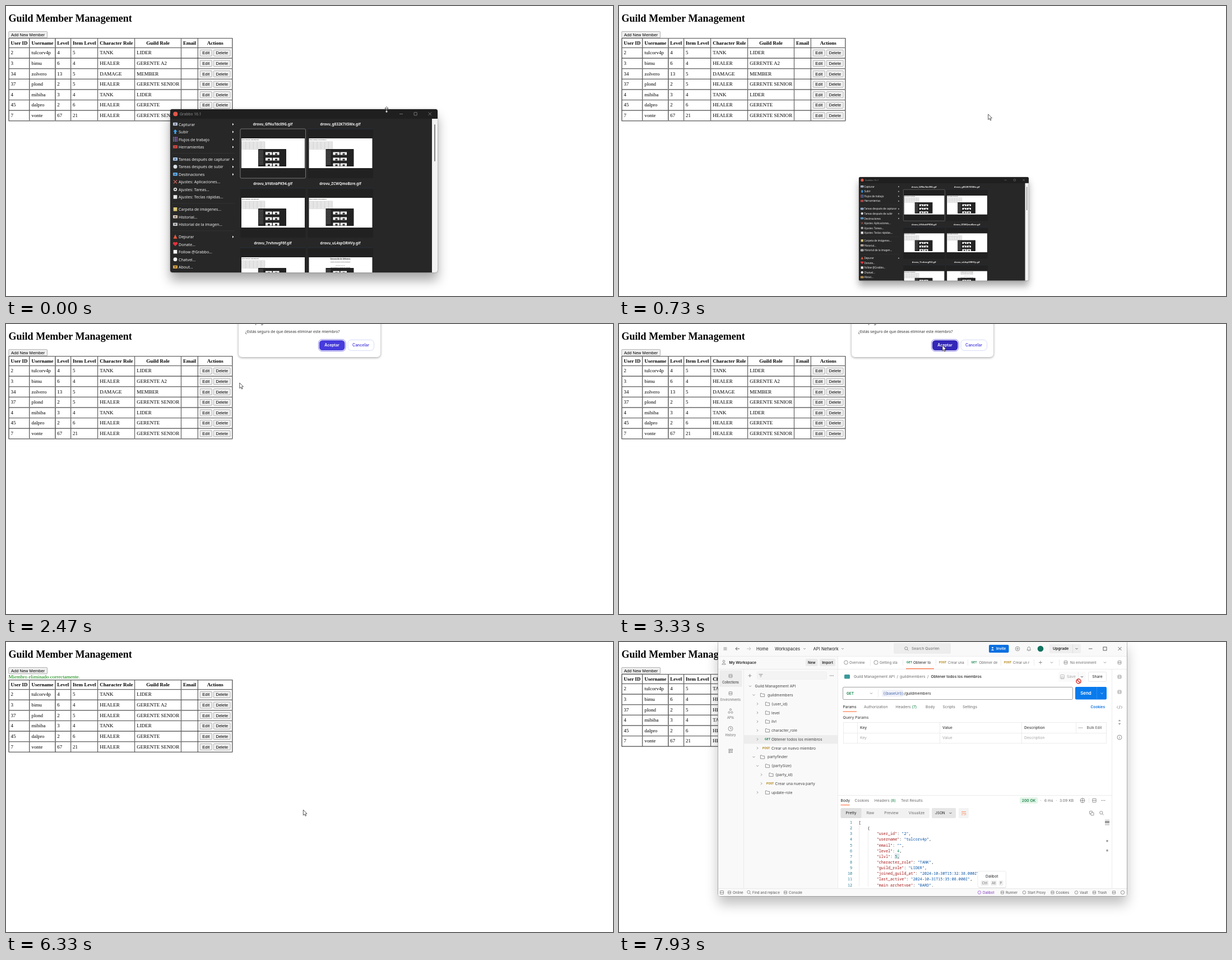
Recreate the animation shown at these times as an HTML page. Size 1083x517 px, loop 8000 ms.

```html
<!DOCTYPE html>
<html lang="es">
<head>
<meta charset="utf-8">
<title>Guild Member Management</title>
<style>
html, body { margin: 0; width: 100%; height: 100%; overflow: hidden; background: #fff; }
#page { position: absolute; width: 1920px; transform: scale(.56406); transform-origin: 0 0;
  font: 16px "Liberation Serif", "Times New Roman", serif; color: #000; }
#body { margin: 21.44px 8px 0; }
h1 { font-size: 32px; line-height: 37px; margin: 0 0 21.44px; }
#add { height: 21px; }
button { height: 21px; box-sizing: border-box; padding: 1px 7px; border: 1px solid #767676; border-radius: 3px;
  background: #efefef; color: #000; font: 13.333px/15px "Liberation Sans", Arial, sans-serif; vertical-align: baseline; }
button.hover { background: #e0e0e0; border-color: #4f4f4f; }
#msg { color: green; height: 18px; line-height: 18px; }
table { border: 1px solid #2a2a2a; border-spacing: 0; }
th, td { border: 1px solid #2a2a2a; padding: 5px; line-height: 18px; white-space: nowrap; }
td { height: 21px; }
td:last-child { line-height: 0; }
.win { position: absolute; overflow: hidden; }
.win svg { display: block; }
#grab { left: 293px; top: 184px; width: 477px; height: 291px; border-radius: 4px; transform-origin: 0 0;
  box-shadow: 0 14px 20px rgba(0,0,0,.34), 0 0 3px rgba(0,0,0,.3); font-family: "Noto Sans", sans-serif; }
#api { left: 177px; top: -2px; width: 729px; height: 455px; border-radius: 4px; transform-origin: 486px 518px;
  box-shadow: 0 14px 22px rgba(0,0,0,.25), 0 0 0 .6px #999; font-family: Inter, sans-serif; }
#dlg { left: 415px; top: -20px; width: 253px; height: 79px; border-radius: 6px; background: #fff;
  box-shadow: 0 1px 4px rgba(0,0,0,.4); font-family: "Noto Sans", sans-serif; }
#card { left: 767px; top: 424px; width: 115px; height: 100px; border-radius: 4px; background: #f3f3f3;
  box-shadow: 0 0 1px #777; }
#cur { position: absolute; left: 0; top: 0; overflow: visible; }
</style>
</head>
<body>
<div id="page"><div id="body">
  <h1>Guild Member Management</h1>
  <div id="add"><button>Add New Member</button></div>
  <div id="msg">Miembro eliminado correctamente.</div>
  <table id="table"></table>
</div></div>
<div class="win" id="dlg"></div>
<div class="win" id="grab"></div>
<div class="win" id="card"></div>
<div class="win" id="api"></div>
<svg id="cur" width="1" height="1">
  <path id="arrow" d="M0 0V9.6L2.2 7.6 3.8 11 5.3 10.3 3.8 7 6.7 6.8Z" fill="#fff" stroke="#111" stroke-width=".7"/>
  <path id="resize" d="M0-5.5L3-2.3H.8V2.3H3L0 5.5-3 2.3H-.8V-2.3H-3Z" fill="#fff" stroke="#111" stroke-width=".7"/>
  <g id="no" fill="none" stroke="#d8302c" stroke-width="1.5"><circle r="4" fill="#fff"/><path d="M-2.8-2.8L2.8 2.8"/></g>
</svg>
<script>
const $ = id => document.getElementById(id);
const INK = '#212121', MID = '#6b6b6b', PALE = '#a6a6a6', LINE = '#e4e4e4', ORANGE = '#ff6c37',
  GREEN = '#0a8043', AMBER = '#ad7a03', BLUE = '#0a70e0';

// Drawing helpers: y of a text is its middle line
const T = (x, y, s, c = INK, w = 400, z = 6.77, a = 'start') =>
  `<text x="${x}" y="${y + z * .36}" font-size="${z}" fill="${c}" font-weight="${w}" text-anchor="${a}">${s}</text>`;
const R = (x, y, w, h, f, r = 0, s = 'none') =>
  `<rect x="${x}" y="${y}" width="${w}" height="${h}" fill="${f}" rx="${r}" stroke="${s}" stroke-width=".7"/>`;
const P = (d, c = MID, f = 'none', w = .7) => `<path d="${d}" fill="${f}" stroke="${c}" stroke-width="${w}"/>`;
const C = (x, y, r, f = 'none', s = MID) => `<circle cx="${x}" cy="${y}" r="${r}" fill="${f}" stroke="${s}" stroke-width=".7"/>`;
const down = (x, y, c) => P(`M${x - 2} ${y - 1}l2 2l2-2`, c);
const right = (x, y) => P(`M${x - 1} ${y - 2}l2 2l-2 2`);
const box = (x, y, r = 2.8) => R(x - r, y - r, 2 * r, 2 * r, 'none', .6, MID) + P(`M${x - r} ${y}h${2 * r}`);
const folder = (x, y) => P(`M${x - 3.6} ${y - 3}h2.6l1 1.2h3.6v4.8h-7.2z`);
const dots = (x, y) => [-2.6, 0, 2.6].map(d => C(x + d, y, .7, MID, 'none')).join('');
const glass = (x, y) => C(x - .7, y - .7, 2.6) + P(`M${x + 1.2} ${y + 1.2}l2.3 2.3`);
const plus = (x, y) => P(`M${x - 3} ${y}h6M${x} ${y - 3}v6`);
const hline = (x, y, w, c = LINE) => P(`M${x} ${y}h${w}`, c);
const vline = (x, y, h, c = LINE) => P(`M${x} ${y}v${h}`, c);
const svg = (x, y, w, h, s) => `<svg width="${w}" height="${h}" viewBox="${x} ${y} ${w} ${h}">${s}</svg>`;

// Page table
const members = `2|tulcorv4p|4|5|TANK|LIDER
3|bimu|6|4|HEALER|GERENTE A2
34|zolvero|13|5|DAMAGE|MEMBER
37|plond|2|5|HEALER|GERENTE SENIOR
4|mibiba|3|4|TANK|LIDER
45|dalpro|2|6|HEALER|GERENTE
7|vonte|67|21|HEALER|GERENTE SENIOR`.split('\n').map(r => r.split('|'));
$('table').innerHTML = '<tr>' + ['User ID', 'Username', 'Level', 'Item Level', 'Character Role', 'Guild Role', 'Email', 'Actions']
  .map(h => `<th>${h}</th>`).join('') + '</tr>' + members.map(m => '<tr>' + m.map(c => `<td>${c}</td>`).join('') +
  '<td></td><td><button>Edit</button><span style="font-size:16px"> </span><button>Delete</button></td></tr>').join('');
const doomed = $('table').rows[3], buttons = [...document.querySelectorAll('button')];

// Confirmation dialog
$('dlg').innerHTML = svg(415, -20, 253, 79,
  T(427, -3, 'Esta página dice', INK, 400, 8) +
  T(427, 14, '¿Estás seguro de que deseas eliminar este miembro?', '#333', 400, 6.8) +
  R(557.5, 27.5, 48.5, 21, '#fff', 6.5, '#5a50dd') + '<g id="ok">' + R(559, 29, 45.5, 18, 'currentColor', 5.5) + '</g>' +
  R(610, 28.3, 46.5, 19, '#fff', 6, '#c3cdf6') + '<g font-family="Inter, sans-serif">' +
  T(581.5, 38, 'Aceptar', '#fff', 600, 6.9, 'middle') + T(633, 38, 'Cancelar', '#5046e0', 600, 6.9, 'middle') + '</g>');

// Capture tool window
function shot(x, y, doc) {
  let s = R(x, y, 113, 53, '#fff');
  if (doc) {
    s += T(x + 56, y + 3, 'Generación de Informes', '#222', 700, 3, 'middle') +
      T(x + 56, y + 8, 'Nuevo informe de datos del gremio', '#333', 600, 2, 'middle') +
      T(x + 56, y + 14, 'Resumen del mes', '#666', 400, 2, 'middle') +
      T(x + 56, y + 18, 'Lista de datos y valores del informe', '#333', 600, 2, 'middle');
  } else {
    s += T(x + .7, y + 2.6, 'Guild Member Management', '#222', 700, 2.2);
    for (let i = 0; i < 8; i++) s += hline(x + 1, y + 6 + i * 1.9, 41, '#bbb');
    for (let i = 0; i < 7; i++) s += vline(x + 1 + i * 6.8, y + 6, 13.4, '#ccc');
  }
  s += R(x + 30, y + 19, 50, 31, '#222', .6);
  for (let i = 0; i < 3; i++)
    for (const d of [43, 56]) s += R(x + d, y + 24.5 + i * 10, 11.5, 5, '#fff') + R(x + d + 4, y + 26.4 + i * 10, 4, 3, '#333');
  for (let i = 0; i < 11; i++) s += hline(x + 31, y + 22 + i * 2.4, 8, '#777');
  return s;
}
// label, icon colour, icon kind, has submenu
const menu = [
  [['Capturar', '#bcc8dc', 'r', 1], ['Subir', '#3fa4f0', 'u', 1], ['Flujos de trabajo', '', 'g', 1], ['Herramientas', '#d8443c', 'r', 1]],
  [['Tareas después de capturar', '#a9c8ee', 'r', 1], ['Tareas después de subir', '#dcdfe6', 'c', 1], ['Destinaciones', '#5aa9e6', 'r', 1],
    ['Ajustes: Aplicaciones...', '#d0645c', 'x'], ['Ajustes: Tareas...', '#d8d8d8', 'o'], ['Ajustes: Teclas rápidas...', '#e8e8e8', 'q']],
  [['Carpeta de imágenes...', '#dcc878', 'q'], ['Historial...', '#d8c6b4', 'r'], ['Historial de la imagen...', '#c9c9c9', 'r']],
  [['Depurar', '#e8583c', 't', 1], ['Donate...', '#e2323c', 'h'], ['Follow @Grabbo...', '#f4f4f4', 'q'], ['Chatvel...', '#f4f4f4', 'c'], ['About...', '#d9a441', 'r']]
];
function icon(x, y, c, kind) {
  switch (kind) {
    case 'u': return P(`M${x} ${y - 4}l3.5 4h-2v4h-3v-4h-2z`, 'none', c);
    case 'g': return [0, 1, 2, 3, 4, 5, 6, 7, 8].map(i => R(x - 4 + i % 3 * 3, y - 4 + (i / 3 | 0) * 3, 2, 2, ['#e0566a', '#4fa3e8', '#9b6ad8'][i % 3])).join('');
    case 'c': return C(x, y, 3.4, c, 'none');
    case 'x': return P(`M${x - 3} ${y - 3}l6 6M${x + 3} ${y - 3}l-6 6`, c, 'none', 1.3);
    case 'o': return C(x, y, 3.2, c, 'none') + C(x, y, 1.2, '#272727', 'none');
    case 'q': return R(x - 3.3, y - 3.3, 6.6, 6.6, c);
    case 't': return P(`M${x} ${y - 4}l3.5 7.6h-7z`, 'none', c);
    case 'h': return P(`M${x} ${y + 3.5}l-4-4.2a2 2 0 0 1 4-2a2 2 0 0 1 4 2z`, 'none', c);
    default: return R(x - 4, y - 2.8, 8, 5.6, c, .8) + R(x - 1.5, y - 1, 3, 2, '#556');
  }
}
function grabWindow() {
  let s = R(293, 184, 477, 291, '#272727') + R(293, 184, 477, 17, '#1f1f1f') + C(302.3, 192.5, 4, '#e0584a', 'none') +
    T(310, 192.5, 'Grabbo 16.1', '#8f8f8f', 400, 6.7) + hline(702, 192.5, 6, '#999') +
    R(728, 189.7, 5.2, 5.2, 'none', .5, '#999') + P('M753.5 189.5l5.6 5.6m0-5.6l-5.6 5.6', '#999') +
    R(760, 201, 10, 274, '#f2f2f2') + R(764, 211, 2, 66, '#858585', 1);
  let y = 211;
  for (const group of menu) {
    for (const [label, c, kind, sub] of group) {
      s += icon(302, y - .5, c, kind) + T(308, y, label, '#f0f0f0', 400, 7.05);
      if (sub) s += P(`M404 ${y - 2.3}l2.4 2.2l-2.4 2.2z`, 'none', '#fff');
      y += 13.5;
    }
    if (y < 470) s += hline(297, y - 2.5, 111, '#383838');
    y += 8.4;
  }
  const files = ['GfNuTdc09G', 'g832K7X5Wx', 'bYdtnbPK94', 'ZCWQmoBzre', '7rvhnvgF6f', 'uL4spORHVy'];
  files.forEach((f, i) => {
    const x = 418 + i % 2 * 120.5, top = 219 + (i >> 1) * 106;
    s += T(x + 58, top - 8, `drovu_${f}.gif`, '#f0f0f0', 700, 6.4, 'middle') +
      R(x, top, 116.5, 88, '#212121', 2, i ? 'none' : '#999') + (i ? hline(x, top, 116, '#2a3648') : '') + shot(x + 2, top + 17, i == 5);
  });
  return svg(293, 184, 477, 291, s);
}
$('grab').innerHTML = grabWindow();

// API client window
function apiWindow() {
  const small = 6.2;
  let s = R(177, -2, 729, 455, '#fff') + R(177, -2, 729, 27, '#f9f9f9') + R(177, 25, 213, 414, '#f9f9f9');
  // title bar
  s += P('M186.5 10h6m-6 2h6m-6 2h6') + P('M215 12h-7m3-3l-3 3l3 3', INK) + P('M228 12h7m-3-3l3 3l-3 3', PALE) +
    T(245, 12, 'Home', INK, 400, 7.7) + T(278, 12, 'Workspaces', INK, 400, 7.7) + T(346.5, 12, 'API Network', INK, 400, 7.7) +
    down(331, 12) + down(399, 12) + R(490, 2, 102, 19, '#ededed', 2) + glass(513, 12) + T(522, 11.8, 'Search Quorlen', MID) +
    R(660, 5, 35.5, 14, BLUE, 2) + C(666.5, 10.3, 1.3, '#fff', 'none') + P('M664 15q2.5-4 5 0z', 'none', '#fff') + T(673, 12, 'Invite', '#fff', 600, 6.5) +
    C(711, 12, 3.8) + C(711, 12, 1.3) + P('M728 14.5h6.6l-1-1.5v-2a2.3 2.3 0 0 0-4.6 0v2zm2.5 1.5h1.6') + C(752, 12, 5.3, '#12735f', 'none') +
    R(768, 4, 56, 16, '#efefef', 2) + T(774, 12, 'Upgrade', INK, 600, 6.8) + vline(809.5, 4, 16, '#d8d8d8') + down(816.5, 12, INK) +
    hline(838, 12, 6.5, INK) + R(864, 9, 6, 6, 'none', 0, INK) + P('M890.5 9l6 6m0-6l-6 6', INK);
  // second bar
  s += hline(177, 25.5, 729) + hline(177, 48.5, 729) + C(187, 34.3, 1.8) + P('M183.7 40q3.3-5.5 6.6 0z') + T(196.5, 36.5, 'My Workspace', INK, 600, 6.7) +
    R(333, 30, 21.5, 13, '#ebebeb', 2) + T(343.7, 36.5, 'New', INK, 600, 6.2, 'middle') +
    R(358, 30, 28, 13, '#ebebeb', 2) + T(372, 36.5, 'Import', INK, 600, 6.2, 'middle') +
    C(405, 36.5, 3.4) + T(411, 36.5, 'Overview', MID, 400, small) + C(458.5, 36.5, 3.6) + T(465, 36.5, 'Getting sta', MID, 400, small) +
    plus(752, 36.5) + down(772, 36.5) + box(797, 36.5) + T(805, 36.5, 'No environment', MID, 400, small) + down(867, 36.5) + box(893, 36.5);
  for (const x of [448, 506, 565, 622, 681, 740, 785]) s += vline(x + .5, 31, 11);
  for (const [x, verb, tx, name, c] of [[513, 'GET', 525, 'Obtener to', INK], [571, 'POST', 587, 'Crear una', MID], [628.5, 'GET', 642.5, 'Obtener de', MID], [687, 'POST', 703, 'Crear un r', MID]])
    s += T(x, 36.7, verb, verb == 'GET' ? GREEN : AMBER, 700, 4.9) + T(tx, 36.5, name, c, 400, small);
  s += R(512, 47, 50, 1.2, ORANGE);
  // left rail
  s += R(179, 50.5, 40.5, 29.5, '#ededed', 2) + vline(222.5, 48, 391) + vline(390.5, 25, 414) + box(199, 60.5) + box(199, 91.5) +
    C(199, 120.5, 1.6) + C(196.5, 125.5, 1.6) + C(201.5, 125.5, 1.6) + C(199, 154.5, 4) + P('M199 152v3h2') +
    R(196, 191, 2.4, 2.4, 'none', 0, MID) + R(200, 191, 2.4, 2.4, 'none', 0, MID) + R(196, 195, 2.4, 2.4, 'none', 0, MID) + P('M199.6 196.2h3.4m-1.7-1.7v3.4');
  [['Collections', 71.5], ['Environments', 102.5], ['APIs', 134.5], ['History', 166]].forEach(([n, y], i) =>
    s += T(199, y, n, i ? MID : INK, 400, 5.64, 'middle'));
  // collection tree: chevron x, open, mark x, mark, text x, text
  s += plus(233.5, 60) + R(246.5, 53, 124, 13.5, '#f4f4f4', 2, '#eee') + P('M249.5 57.5h7m-5.6 2.3h4.2m-2.8 2.3h1.4') + dots(379.5, 60) + R(223, 166, 167, 15.5, '#ededed');
  [[234, 1, 0, '', 242.5, 'Guild Management API'], [240.5, 1, 256, 'F', 265, 'guildmembers'], [247, 0, 265, 'F', 272, '{user_id}'],
    [247, 0, 265, 'F', 272, 'level'], [247, 0, 265, 'F', 272, 'ilvl'], [247, 0, 265, 'F', 272, 'character_role'],
    [247, 0, 260, 'GET', 272, 'Obtener todos los miembros'], [247, 0, 256, 'POST', 272, 'Crear un nuevo miembro'],
    [240.5, 1, 256, 'F', 265, 'partyfinder'], [247, 1, 265, 'F', 272, '{partySize}'], [254, 0, 271.5, 'F', 279, '{party_id}'],
    [254, 0, 263, 'POST', 278.5, 'Crear una nueva party'], [247, 0, 265, 'F', 272, 'update-role']
  ].forEach(([cx, open, mx, mark, x, label], i) => {
    const y = 78.7 + i * 15.79;
    s += (open ? down : right)(cx, y) + T(x, y, label, '#444', 400, 6.77);
    if (mark == 'F') s += folder(mx, y);
    else if (mark) s += T(mx, y, mark, mark == 'GET' ? GREEN : AMBER, 700, 4.9);
  });
  // request
  s += R(402, 58, 10, 7.5, '#3a9a9c', 1.5) + T(419, 62, 'Guild Management API', MID) + T(495.5, 62, '/', MID) + T(501, 62, 'guildmembers', MID) +
    T(550, 62, '/', MID) + T(556.5, 62, 'Obtener todos los miembros', INK, 500, 6.7) +
    R(784, 53, 49, 18, '#fafafa', 2) + R(787.5, 58.5, 7, 7, 'none', 1, PALE) + R(789.5, 62, 3, 3.5, 'none', 0, PALE) + T(799, 62, 'Save', PALE) + vline(819.5, 53, 18) + down(826, 62, INK) +
    R(837.5, 53.5, 32, 17, '#fff', 2, '#ddd') + T(853.5, 62, 'Share', INK, 400, 6.77, 'middle') +
    R(399.5, 80.5, 410, 22, '#fff', 2, '#777') + T(406, 91.5, 'GET', GREEN, 600, 6.5) + down(450, 91.5) + vline(462.5, 85, 13) +
    R(469, 85.5, 38, 12, '#f0f1f8', 1.5) + T(471.5, 91.3, '{{baseUrl}}', '#3c62ad') + T(508.5, 91.3, '/guildmembers') +
    R(814, 80, 56, 22.5, '#097bed', 2) + T(833, 91.3, 'Send', '#fff', 600, 7.9, 'middle') + vline(852.5, 80, 22.5, '#3f97f1') + down(861.5, 91.5, '#fff');
  const counted = (n, c) => `${n} <tspan fill="${GREEN}">(${c})</tspan>`;
  [[399.5, 'Params'], [437, 'Authorization'], [493.5, counted('Headers', 7)], [547, 'Body'], [577.5, 'Scripts'], [613, 'Settings']]
    .forEach(([x, n], i) => s += T(x, 116, n, i ? MID : INK));
  s += T(841.5, 116, 'Cookies', BLUE, 600, 6.5) + R(399.5, 123.5, 24.5, 1.1, ORANGE) + T(399.5, 134.8, 'Query Params', '#555', 500) +
    R(400.5, 143.5, 469, 37, 'none', 0, LINE) + hline(400, 162.5, 470) + vline(815.5, 143, 19.5);
  for (const x of [425.5, 572.5, 718.5]) s += vline(x, 143, 37.7);
  [[430, 'Key'], [577, 'Value'], [723, 'Description']].forEach(([x, n]) => s += T(x, 153, n, '#555', 600, 6.6) + T(x, 171, n, PALE));
  s += dots(823.5, 153) + T(834.5, 153, 'Bulk Edit', MID, 500, 6.5);
  // response
  s += hline(390.5, 273.5, 489);
  [[395.5, 'Body'], [420.5, 'Cookies'], [455.7, counted('Headers', 8)], [503, 'Test Results']].forEach(([x, n], i) => s += T(x, 282.5, n, i ? MID : INK));
  s += R(395.5, 290, 16, 1.1, ORANGE) + R(715, 277, 32, 11, '#e3f5e8', 2) + T(731, 282.5, '200 OK', '#0a7a3c', 500, 6.77, 'middle') +
    C(752.5, 282.5, .6, PALE, 'none') + T(759, 282.5, '6 ms', MID) + C(780.5, 282.5, .6, PALE, 'none') + T(786, 282.5, '3.09 KB', MID) +
    C(827, 282.5, 4) + P('M823 282.5h8m-4-4v8') + vline(838.5, 278, 9) + box(848, 282.5, 3.2) + dots(864, 282.5) +
    R(395.5, 296, 158.5, 18, '#f1f1f1', 2) + R(395.5, 296, 37, 18, '#e0e0e0', 2) + R(558, 296, 43, 18, '#e6e6e6', 2) + T(564, 305, 'JSON', INK, 400, 6.5) + down(591.5, 305, INK) +
    R(606, 296, 18, 18, '#f3f3f3', 2) + P('M611 302.5h8m-8 2.7h6.5a1.4 1.4 0 0 1 0 2.8h-2m-4.5 0h2.5', ORANGE) +
    R(839.5, 301.5, 5, 5, 'none', .6, MID) + R(842, 304, 5, 5, '#fff', .6, MID) + glass(861, 305);
  [[414, 'Pretty'], [448.5, 'Raw'], [486, 'Preview'], [531, 'Visualize']].forEach(([x, n], i) => s += T(x, 305, n, i ? MID : INK, 400, 6.77, 'middle'));
  // response body
  const fields = { user_id: '2', username: members[0][1], email: '', level: 4, ilvl: 5, character_role: 'TANK', guild_role: 'LIDER',
    joined_guild_at: '2024-10-30T15:32:38.000Z', last_active: '2024-10-31T15:35:08.000Z', main_archetype: 'BARD' };
  const lines = [[427.5, '['], [443.5, '{'], ...Object.entries(fields).map(([k, v]) => [459.7,
    `<tspan fill="#a31515">"${k}"</tspan>: <tspan fill="${v.big ? '#0451a5' : '#098658'}">${JSON.stringify(v)}</tspan>,`])];
  s += R(491.5, 377, 9, 10, '#dfe6ee') + vline(428.5, 327, 109) + vline(444.5, 337, 99) + '<g font-family="Noto Sans Mono, monospace">';
  lines.forEach(([x, code], i) => {
    const y = 321.6 + i * 10.14;
    s += T(416, y, i + 1, '#237893', 400, 6.77, 'end') + T(x, y, code);
  });
  s += '</g>' + R(867, 316.5, 8, 10.5, '#d8d8d8') + R(867, 320.3, 8, 1.3, '#444') + R(869.5, 353, 3, 3.4, '#999') + R(869.5, 370, 3, 3.4, '#999') + R(391, 436, 488, 3, '#fff');
  // right rail
  s += vline(879.5, 48, 391) + box(893, 62) + box(893, 89) + P('M890.5 114l-2.3 2.3l2.3 2.3m5-4.6l2.3 2.3l-2.3 2.3m-1.6-5.4l-1.8 6.2') +
    P('M891 141l2-2l2 2m-4 4l2 2l2-2m-2-6v3m0 2v3') + C(893, 170, 4) + P('M893 169.3v3m0-4.6v.8');
  // status bar
  s += R(177, 439, 729, 14, '#f9f9f9') + hline(177, 439.5, 729) + box(183.5, 446.5, 3) + box(883, 446.5, 2.6) + C(898.5, 446.5, 3.2);
  [[203, 'Online'], [238, 'Find and replace'], [303, 'Console'], [649, 'Dalibot'], [690, 'Runner'], [729, 'Start Proxy'], [779.5, 'Cookies'], [822, 'Vault'], [854, 'Trash']]
    .forEach(([x, n], i) => s += (i == 1 ? glass(x - 6, 446.5) : i % 2 ? C(x - 6, 446.5, 2.8, 'none', i == 3 ? '#8a3fd0' : MID) : box(x - 6, 446.5, 2.5)) + T(x, 446.5, n, i == 3 ? '#7a35bd' : '#555', 400, small));
  // tooltip
  s += R(641, 410, 50, 29, '#0001', 3) + R(640, 408.5, 50.5, 29, '#fff', 3, LINE) + T(665.3, 418, 'Dalibot', INK, 400, 6.77, 'middle');
  [[652.5, 'Ctrl', 14], [668.5, 'Alt', 11], [681.5, 'P', 8]].forEach(([x, n, w]) => s += R(x - w / 2, 425, w, 9.5, '#f0f0f0', 1.5) + T(x, 429.8, n, MID, 400, 5.64, 'middle'));
  return svg(177, -2, 729, 455, s);
}
$('api').innerHTML = apiWindow();
$('card').innerHTML = '<svg width="115" height="100">' + C(10, 10, 3.5, ORANGE, 'none') + R(6, 22, 103, 64, '#fff', 1, '#ddd') +
  R(6, 22, 30, 64, '#f4f4f4') + hline(6, 29, 103) + R(96, 34, 8, 3.5, '#097bed') + '</svg>';

// Pointer path: time, x, y
const path = [[0, 679, 185], [70, 679, 185], [400, 705, 191], [600, 705, 191], [733, 659, 193], [800, 600, 185], [867, 535, 173], [1000, 440, 153],
  [1333, 373, 134], [1420, 373, 134], [2000, 375, 118.5], [2220, 375, 118.5], [3070, 580, 52], [3330, 577, 38], [5140, 577, 38], [5740, 114, 105],
  [6000, 255, 121], [6700, 848, 505], [6733, 840, 524], [7280, 838, 524], [7700, 826, 96], [7870, 822, 90], [7930, 820, 70], [8100, 820, 70]];
const clamp = v => Math.max(0, Math.min(1, v));
function pointer(t) {
  const i = Math.max(1, path.findIndex(k => k[0] > t)), [t0, x0, y0] = path[i - 1], [t1, x1, y1] = path[i];
  let p = (t - t0) / (t1 - t0);
  if (t1 - t0 > 250) p = p * p * (3 - 2 * p);
  return [x0 + (x1 - x0) * p, y0 + (y1 - y0) * p];
}
const show = (el, on) => el.style.display = on ? '' : 'none';

const LOOP = 8000, STEP = 1000 / 15;
function draw(now) {
  const t = Math.floor((now % LOOP + 4) / STEP) * STEP;
  show($('msg'), t > 4780 && t < 7780);
  show(doomed, t < 4780);

  const shrink = clamp((t - 600) / 130) ** 2;
  show($('grab'), t < 780);
  $('grab').style.transform = `translate(${135 * shrink}px,${121 * shrink}px) scale(${1 - .365 * shrink})`;

  const shown = clamp((t - 2210) / 180) * (1 - clamp((t - 4640) / 300));
  show($('dlg'), shown > 0);
  $('dlg').style.opacity = shown;
  $('dlg').style.transform = `translateY(${-11.5 * (1 - shown)}px)`;
  $('ok').style.color = t > 3100 ? '#3327b8' : '#463bdc';

  show($('card'), t > 6840 && t < 7050);
  const grow = clamp((t - 7100) / 300);
  show($('api'), grow > 0);
  $('api').style.opacity = clamp((t - 7100) / 80);
  $('api').style.transform = `scale(${1 - .65 * (1 - grow) ** 3})`;

  const [x, y] = pointer(t), blocked = t > 7900, edge = t < 100;
  $('cur').style.transform = `translate(${x}px,${y}px)`;
  show($('resize'), edge);
  show($('no'), blocked);
  show($('arrow'), !edge && !blocked);
  for (const b of buttons) {
    const r = b.getBoundingClientRect();
    b.className = x >= r.left && x < r.right && y >= r.top && y < r.bottom ? 'hover' : '';
  }
}
const start = performance.now();
(function tick() {
  draw(performance.now() - start);
  requestAnimationFrame(tick);
})();
</script>
</body>
</html>
```
